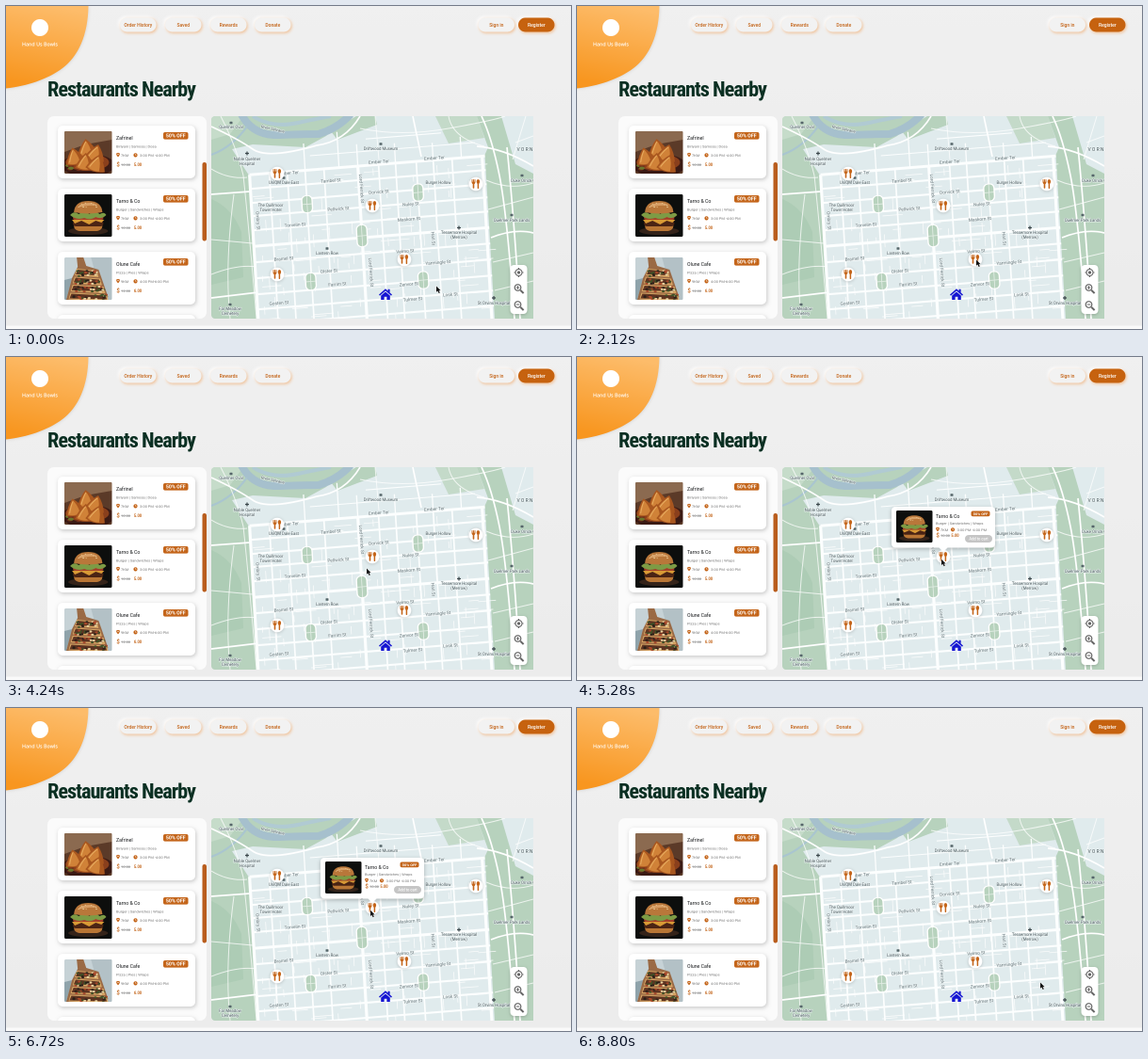
Recreate the animation shown at these times as an HTML page with a canvas. Size 600 by 343 pixels, loop 8880 ms.

```html
<!DOCTYPE html>
<html lang="en">
<head>
<meta charset="utf-8">
<title>Restaurants Nearby</title>
<style>
html, body { margin: 0; width: 100%; height: 100%; overflow: hidden; background: #eee; }
canvas { display: block; width: 600px; height: 343px; }
</style>
</head>
<body>
<canvas id="stage"></canvas>
<script>
const W = 600, H = 343, LOOP = 8880;
const RUST = '#c4651a', INK = '#16181a', GREY = '#777';
const LAND = '#e0ebed', PARK = '#b7d2bd';
const stage = document.getElementById('stage');
const ratio = Math.max(2, window.devicePixelRatio || 1);
const base = document.createElement('canvas');
for (const c of [stage, base]) { c.width = W * ratio; c.height = H * ratio; }
let g = base.getContext('2d');
g.scale(ratio, ratio);

const dishes = [
  { name: 'Zafrinel', menu: 'Biriyani | Samosa | Dosa', km: '7KM', time: '3:00 PM -4:00 PM', was: '10.00', now: '5.00', art: samosas },
  { name: 'Tarno & Co', menu: 'Burger | Sandwiches | Wraps', km: '7KM', time: '3:00 PM -4:00 PM', was: '10.00', now: '5.00', art: burger },
  { name: 'Olune Cafe', menu: 'Pizza | Pies | Wraps', km: '9KM', time: '4:00 PM-6:00 PM', was: '12.00', now: '6.00', art: pizza }
];
const pins = [[288, 178], [389, 212], [499, 189], [423, 269], [288, 285]];

// ---------- helpers ----------
function text(s, x, y, size, color, o = {}) {
  g.font = `${o.weight || 400} ${size}px ${o.font || 'Roboto'}, sans-serif`;
  g.textAlign = o.align || 'left';
  g.textBaseline = 'alphabetic';
  g.fillStyle = color;
  g.fillText(s, x, y);
}
function box(x, y, w, h, r, color) {
  g.beginPath();
  g.roundRect(x, y, w, h, r);
  g.fillStyle = color;
  g.fill();
}
function shadow(color, blur, dx, dy) {
  g.shadowColor = color;
  g.shadowBlur = blur * ratio;
  g.shadowOffsetX = dx * ratio;
  g.shadowOffsetY = dy * ratio;
}
function noShadow() { shadow('transparent', 0, 0, 0); }
function oval(x, y, rx, ry, color, turn = 0) {
  g.beginPath();
  g.ellipse(x, y, rx, ry, turn, 0, 7);
  g.fillStyle = color;
  g.fill();
}
function shape(d, color) { g.fillStyle = color; g.fill(new Path2D(d)); }
function line(d, color, width) {
  g.strokeStyle = color;
  g.lineWidth = width;
  g.stroke(new Path2D(d));
}
function seeded(n) {
  return () => (n = (n * 16807) % 2147483647) / 2147483647;
}

// ---------- food pictures, 50 x 45 units ----------
function samosas() {
  shape('M0 0H50V45H0Z', '#5b3a28');
  shape('M0 0H50V9L22 14L0 22Z', '#8b6a50');
  oval(25, 36, 28, 12, '#3a1a14');
  oval(24, 33, 23, 9, '#8a3f1c');
  const rnd = seeded(8);
  for (let i = 0; i < 12; i++) oval(4 + rnd() * 42, 36 + rnd() * 6, 3, 1.6, i % 3 ? '#74301a' : '#69752c');
  const folds = [[14, 16, -.1], [25, 18, .3], [1, 26, -.2], [13, 29, .1], [26, 29, .3]];
  for (const [x, y, a] of folds) {
    g.save();
    g.translate(x, y);
    g.rotate(a);
    shape('M-1 10Q2 0 9 -7Q17 0 20 9Q9 14 -1 10Z', '#a8561f');
    shape('M1 9Q4 1 9 -5Q13 0 14 10Q7 12 1 9Z', '#d08238');
    line('M3 8Q6 0 9 -4', '#e8ac60', 1);
    g.restore();
  }
}
function burger() {
  shape('M0 0H50V45H0Z', '#0d0e0d');
  oval(25, 39, 21, 4, '#34231a');
  shape('M10 33H40Q40 38 34 39H16Q10 38 10 33Z', '#b97635');
  box(9, 28, 32, 6, 3, '#4b2414');
  shape('M8 27H42L39 30L33 28L26 32L18 28L11 31Z', '#d99a35');
  box(9, 23, 32, 4, 2, '#a5402a');
  shape('M6 22Q10 17 15 21Q21 17 26 21Q33 17 37 21Q42 18 44 22Q39 27 33 24Q27 28 21 25Q13 28 6 22Z', '#7d9b45');
  shape('M10 19Q11 7 25 7Q39 7 40 19Q25 22 10 19Z', '#b9773a');
  shape('M14 14Q18 9 26 9Q32 9 35 12Q25 11 14 14Z', '#d8a067');
  const rnd = seeded(5);
  for (let i = 0; i < 13; i++) oval(15 + rnd() * 20, 9 + rnd() * 7, .7, .4, '#f2d9a4');
}
function pizza() {
  shape('M0 0H50V45H0Z', '#c6d2d6');
  shape('M28 0H50V45H40Z', '#b3c1c6');
  shape('M0 24L8 22L2 45H0Z', '#8fa3ab');
  shape('M13 0H20L23 9L36 13L46 42L42 45H2L8 22L14 10Z', '#9a6a45');
  const rnd = seeded(31);
  for (let row = 0; row < 4; row++) {
    const y = 12 + row * 8.5, x = 13 - row * 2.2, end = 34 + row * 3.5;
    shape(`M${x} ${y}L${end} ${y + 2}L${end + 2} ${y + 9}L${x - 2} ${y + 7}Z`, '#d9a765');
    shape(`M${x + 1} ${y + 1}L${end - 1} ${y + 3}L${end} ${y + 7}L${x - 1} ${y + 6}Z`, '#5d3422');
    for (let i = 0; i < 22; i++) {
      oval(x + 1 + rnd() * (end - x), y + 2 + rnd() * 6, 1.5, 1, ['#3f5127', '#a8482a', '#e9d3a0', '#2b2018'][i % 4]);
    }
  }
}
function photo(art, x, y, w, h) {
  g.save();
  g.beginPath();
  g.roundRect(x, y, w, h, 1.5);
  g.clip();
  g.translate(x, y);
  g.scale(w / 50, h / 45);
  art();
  g.restore();
}

// ---------- restaurant cards ----------
function details(d, x, rows, gap) {
  const [name, menu, open, price] = rows;
  text(d.name, x, name, 5.2, INK);
  text(d.menu, x, menu, 4, GREY);
  shape(`M${x + 2} ${open}C${x - 1} ${open - 3} ${x} ${open - 4.5} ${x + 2} ${open - 4.5}S${x + 5} ${open - 3} ${x + 2} ${open}Z`, RUST);
  oval(x + 2, open - 2.9, .6, .6, '#fff');
  text(d.km, x + 5, open - .4, 4, GREY);
  const c = x + gap;
  oval(c, open - 2, 2.1, 2.1, RUST);
  line(`M${c} ${open - 3.4}V${open - 2}H${c + 1}`, '#fff', .5);
  text(d.time, c + 4.6, open - .4, 4, GREY);
  text('$', x + .4, price, 6, RUST, { weight: 500 });
  text(d.was, x + 5.3, price - .4, 3.8, GREY);
  line(`M${x + 5} ${price - 1.8}h10.2`, GREY, .4);
  text(d.now, x + gap - 1.6, price - .4, 4.1, RUST, { weight: 600 });
}
function badge(x, y, w, h, size) {
  box(x, y, w, h, 2, RUST);
  text('50% OFF', x + w / 2, y + h / 2 + size * .36, size, '#fff', { weight: 600, align: 'center' });
}
function card(d, y) {
  shadow('rgba(0,0,0,.2)', 4, 1, 1.5);
  box(55, y, 146, 56, 5, '#fff');
  noShadow();
  photo(d.art, 62, y + 6, 50.5, 45);
  details(d, 117, [y + 15, y + 23.4, y + 33.4, y + 43.4], 20.5);
  badge(167, y + 7, 26.5, 7.6, 5.3);
}
function popup(d, x, y, tip, alpha, button) {
  if (alpha <= 0) return;
  g.save();
  g.globalAlpha = alpha;
  shadow('rgba(0,0,0,.25)', 4, 0, 1.5);
  box(x, y, 110, 43.5, 4, '#fff');
  noShadow();
  shape(`M${tip - 5} ${y + 43}h10l-5 5Z`, '#fff');
  photo(d.art, x + 5, y + 4, 38.5, 34);
  details(d, x + 47, [y + 12, y + 18.8, y + 26.3, y + 32.6], 18);
  badge(x + 84.5, y + 4.5, 20, 5.8, 4);
  if (button > 0) {
    g.globalAlpha = alpha * button;
    box(x + 78, y + 30, 29, 8, 4, '#c5c5c5');
    text('Add to cart', x + 92.5, y + 35.4, 4.1, '#fff', { weight: 500, align: 'center' });
  }
  g.restore();
}

// ---------- page ----------
function header() {
  const bg = g.createLinearGradient(0, 0, 0, H);
  bg.addColorStop(0, '#f0f0f0');
  bg.addColorStop(1, '#ececec');
  g.fillStyle = bg;
  g.fillRect(0, 0, W, H);
  g.fillStyle = '#fafafa';
  g.fillRect(0, 339.5, W, 4);

  const sun = g.createLinearGradient(50, 0, 32, 85);
  sun.addColorStop(0, '#fdbc6a');
  sun.addColorStop(1, '#f8961f');
  shadow('rgba(0,0,0,.1)', 3, .5, .5);
  shape('M0 0H87.5C87 31 77 53 60 66C44 78 22 85 0 87.5Z', sun);
  noShadow();
  oval(36, 23, 9, 9, '#fff');
  text('Hand Us Bowls', 36, 42.6, 5.3, '#fff', { weight: 600, align: 'center', font: '"Open Sans"' });

  const tabs = [['Order History', 121], ['Saved', 169], ['Rewards', 217], ['Donate', 264], ['Sign in', 501.5], ['Register', 544]];
  for (const [label, x] of tabs) {
    const solid = label === 'Register';
    shadow('#fff', 3, -1.5, -1.5);
    box(x, 12.5, 38.5, 15, 7.5, '#f2f2f2');
    shadow('rgba(240,150,70,.55)', 3, 1, 1.3);
    box(x, 12.5, 38.5, 15, 7.5, solid ? '#c6620f' : '#f2f2f2');
    noShadow();
    text(label, x + 19.3, 22.2, 5, solid ? '#fff' : RUST, { weight: 500, align: 'center' });
  }

  const title = 'Restaurants Nearby';
  g.fontStretch = 'condensed';
  g.font = '700 22.3px "Roboto Condensed", Roboto, sans-serif';
  g.textAlign = 'left';
  const slack = (157 - g.measureText(title).width) / title.length;
  g.letterSpacing = Math.max(-1.3, Math.min(.4, slack)) + 'px';
  g.fillStyle = '#0a2f22';
  g.fillText(title, 44, 96);
  g.letterSpacing = '0px';
  g.fontStretch = 'normal';
}
function list() {
  g.save();
  g.beginPath();
  g.roundRect(44, 117, 169, 215, 7);
  g.clip();
  g.fillStyle = '#fbfbfb';
  g.fillRect(44, 117, 169, 215);
  dishes.forEach((d, i) => card(d, 127 + i * 67));
  shadow('rgba(0,0,0,.2)', 4, 1, 1.5);
  box(55, 328, 146, 56, 5, '#fff');
  noShadow();
  box(208.5, 166, 4.5, 83.5, 2.2, '#b95d1d');
  g.restore();
}

// ---------- map ----------
function parks() {
  g.fillStyle = PARK;
  g.fillRect(218, 117, 342, 215);
  shape('M526 117H560V178L541 168Z', LAND);
  shape('M218 117H252L238 136L218 142Z', '#c6dcca');
  shape('M240 152L262 147L318 150L340 138L366 117H500L512 150L505 166L262 186Z', LAND);
  shape('M345 133L372 117H392L394 126L352 142Z', PARK);
  shape('M456 117H500L508 140L470 146Z', '#c4dac9');
  shape('M218 205Q240 214 250 240L252 288L218 296Z', '#adccb5');
  line('M250 115Q262 138 290 137T332 136Q352 130 366 115', '#a6c0cd', 8);
  line('M262 117Q282 130 310 124T345 117', '#b0cad3', 4);
  line('M218 158Q240 150 256 128', '#a9c5d0', 2);
  const paths = [
    'M218 128Q246 141 262 152T330 148Q360 144 376 117',
    'M228 117Q245 150 252 180Q258 236 266 332',
    'M218 173Q236 184 256 182', 'M218 200L259 197', 'M218 248L262 252',
    'M218 285Q246 274 266 277', 'M218 310L268 304', 'M238 332Q232 276 242 200',
    'M392 117L396 163', 'M432 117L441 160', 'M376 130Q420 139 470 130T530 117',
    'M470 117Q474 140 508 149', 'M500 149Q528 151 560 170',
    'M510 185Q535 196 560 188', 'M512 216L560 203', 'M515 246Q540 236 560 241',
    'M517 272L560 262', 'M519 302L560 292', 'M532 150Q540 230 546 332',
    'M552 117L538 163', 'M560 138L541 145', 'M505 117Q516 140 524 180T540 332'
  ];
  paths.forEach((d, i) => line(d, i % 3 ? 'rgba(255,255,255,.75)' : '#fff', i % 3 ? 1 : 1.7));
}
function city() {
  g.save();
  g.transform(1, -.08, .06, 1, 378, 243);
  g.fillStyle = LAND;
  g.fillRect(-115, -74, 250, 177);
  const rnd = seeded(77);
  for (let i = 0; i < 120; i++) {
    const x = -113 + rnd() * 235, y = -70 + rnd() * 160;
    line(rnd() < .5 ? `M${x} ${y}h${8 + rnd() * 14}` : `M${x} ${y}v${6 + rnd() * 9}`, 'rgba(255,255,255,.8)', .8);
  }
  [-73, -58, -43, -29, -14, 3, 20, 37, 54, 70, 86].forEach((y, i) =>
    line(`M-115 ${y}H135`, '#fcfefe', i === 0 || i === 5 ? 3 : 2.1));
  for (const x of [-115, -94, -75, -56, -36, 0, 22, 40, 62, 80, 100, 132])
    line(`M${x} -73V103`, '#fcfefe', Math.abs(x) > 110 || !x ? 3.2 : 1.7);
  for (const x of [-56, -20, 0, 40, 80, 110]) line(`M${x} -73V${-90 - rnd() * 22}`, '#fcfefe', 1.3);
  line('M-50 -88H125M10 -101H90', '#fcfefe', 1.1);
  for (const [x, y] of [[-56, -37], [-57, 45], [62, -40], [62, 53], [0, 1]]) {
    const tall = x ? 8.5 : 11;
    box(x - 6.2, y - tall - 1, 12.4, tall * 2 + 2, 5, '#fff');
    box(x - 4.8, y - tall, 9.6, tall * 2, 4, PARK);
    line(`M${x - 5} ${y}h10M${x} ${y - tall}v${tall * 2}`, '#e6efe8', .8);
  }
  g.restore();
}
function label(s, x, y, turn = 0, size = 4.3) {
  const street = / (St|Ter)$/.test(s);
  g.save();
  g.translate(x, y);
  g.rotate(turn || (street ? -.08 : 0));
  g.font = `400 ${street ? 4.8 : size}px Roboto, sans-serif`;
  g.textAlign = 'center';
  g.lineJoin = 'round';
  g.lineWidth = 1.2;
  g.strokeStyle = 'rgba(240,246,246,.8)';
  g.strokeText(s, 0, 0);
  g.fillStyle = street ? '#66757a' : '#47565b';
  g.fillText(s, 0, 0);
  g.restore();
}
function labels() {
  const streets = [
    ['Ember Ter', 300, 179], ['Ember Ter', 396, 167], ['Ember Ter', 455, 163],
    ['Tambel St', 345, 187], ['Dorvick St', 396, 199], ['Pellwick St', 353, 217],
    ['Nuley St', 430, 212], ['Maskorn St', 428, 228], ['Torvelin St', 307, 234],
    ['Bramel St', 295, 270], ['Velmo St', 424, 262], ['Yarmingle St', 459, 274],
    ['Olster St', 343, 283], ['Zenvor St', 428, 297], ['Farrim St', 352, 297],
    ['Gosten St', 290, 317], ['Tulmer St', 432, 313], ['Losk St', 472, 308]
  ];
  const places = [
    ['Quelmer Oval', 239, 130], ['Noble Quelmer', 256, 164], ['Hospital', 256, 169],
    ['Driftwood Museum', 398, 153], ['UniQM Dale East', 295, 189],
    ['The Quillmoor', 281, 213], ['Tower Hotel', 281, 218], ['Burger Hollow', 459, 189],
    ['Lantern Row', 341, 264], ['Tessemore Hospital', 481, 242], ['(Merrow)', 481, 247],
    ['St Orvins Hospital', 518, 317], ['Quelmer Park Lands', 537, 229],
    ['Duke Orrick College', 555, 187], ['Far Meadow', 238, 323], ['Cemetery', 238, 328]
  ];
  for (const [s, x, y] of [...streets, ...places]) label(s, x, y);
  label('River Selvane', 283, 132, .22);
  label('Lord Ferrick St', 376, 194, 1.5);
  label('Lord Ferrick St', 386, 283, 1.5);
  label('Ombry St', 266, 228, 1.5);
  label('Harl St', 452, 247, 1.5);
  label('V O R N', 551, 154, 0, 5);
  for (const [x, y] of [[256, 156.5], [481, 235.5], [518, 310]])
    line(`M${x - 2} ${y}h4M${x} ${y - 2}v4`, '#3c484c', 1.2);
  for (const [x, y] of [[239, 124], [398, 146.5], [341, 257.5], [295, 182.5], [548, 180], [537, 222], [238, 317]])
    box(x - 1.5, y - 1.3, 3, 2.6, .6, '#56666a');
}
function controls() {
  shadow('rgba(0,0,0,.2)', 3, 0, 1);
  box(535.5, 275, 18, 52, 4, '#fff');
  noShadow();
  const grey = '#666';
  line('M548 283a3.5 3.5 0 1 1 -7 0a3.5 3.5 0 1 1 7 0M544.5 278v2M544.5 286v2M539.5 283h2M547.5 283h2', grey, 1.1);
  oval(544.5, 283, 1.6, 1.6, grey);
  for (const y of [300, 318]) {
    oval(543.5, y - 1, 3.9, 3.9, grey);
    oval(543.5, y - 1, 2.7, 2.7, '#fff');
    line(`M546.3 ${y + 1.8}l3.3 3.3`, grey, 2);
    line(`M541.7 ${y - 1}h3.6` + (y < 310 ? `M543.5 ${y - 2.8}v3.6` : ''), grey, 1);
  }
}
function map() {
  g.save();
  g.beginPath();
  g.roundRect(218, 117, 342, 215, [4, 0, 0, 4]);
  g.clip();
  parks();
  city();
  labels();
  g.restore();
  shape('M396 306.5L403 300.3L405.6 302.6V300.8H407.6V304.4L410 306.5L409 307.6L403 302.4L397 307.6Z', '#1515d2');
  shape('M398.2 307.6L403 303.5L407.8 307.6V312H404.4V308.7H401.6V312H398.2Z', '#1515d2');
  controls();
}
function pin(x, y, hover) {
  g.save();
  g.translate(x, y);
  g.scale(1 + hover * .1, 1 + hover * .1);
  shadow(hover ? 'rgba(225,115,25,.75)' : 'rgba(0,0,0,.18)', 3, 0, .6);
  oval(0, 0, 7.3, 7.3, '#fff');
  noShadow();
  g.lineCap = 'round';
  line('M-4 -4.6V-2M-2.5 -4.6V-2M-1 -4.6V-2', RUST, .9);
  shape('M-4.4 -2.4H-.6Q-.6 -.3 -1.7 0V4.2Q-2.5 5.2 -3.3 4.2V0Q-4.4 -.3 -4.4 -2.4Z', RUST);
  oval(2.4, -2.5, 1.7, 2.4, RUST);
  line('M2.4 -1V4.2', RUST, 1.5);
  g.restore();
}

// ---------- motion ----------
const route = [[0, 457, 297.5], [500, 457, 297.5], [1600, 424, 269.5], [3400, 424, 269.5], [4200, 383, 224.5],
  [4300, 383, 224.5], [4650, 387, 214.8], [7600, 387, 214.8], [8760, 492, 291.5], [LOOP, 492, 291.5]];
function ease(t, a, b) {
  const k = Math.min(1, Math.max(0, (t - a) / (b - a)));
  return k * k * (3 - 2 * k);
}
function span(t, from, to, fade = 200) {
  return ease(t, from, from + fade) - ease(t, to, to + fade);
}
function cursor(t) {
  const i = route.findIndex((p, n) => n && t <= p[0]);
  const a = route[i - 1], b = route[i], k = ease(t, a[0], b[0]);
  g.save();
  g.translate(a[1] + (b[1] - a[1]) * k, a[2] + (b[2] - a[2]) * k);
  const arrow = 'M0 0V6.2L1.5 5L2.6 7.5L3.8 7L2.7 4.6H4.6Z';
  line(arrow, 'rgba(255,255,255,.8)', .8);
  shape(arrow, '#111');
  g.restore();
}
function draw(t) {
  g.setTransform(1, 0, 0, 1, 0, 0);
  g.drawImage(base, 0, 0);
  g.scale(ratio, ratio);
  const first = span(t, 2200, 3450), second = span(t, 4700, 6800);
  pins.forEach(([x, y], i) => pin(x, y, i === 3 ? first : 0));
  popup(dishes[0], 368, 209, 423, first, 0);
  popup(dishes[1], 334, 159, 389, second, ease(t, 4900, 5100));
  cursor(t);
}

header();
list();
map();
g = stage.getContext('2d');
const start = performance.now();
function tick() {
  draw((performance.now() - start) % LOOP);
  requestAnimationFrame(tick);
}
tick();
</script>
</body>
</html>
```
